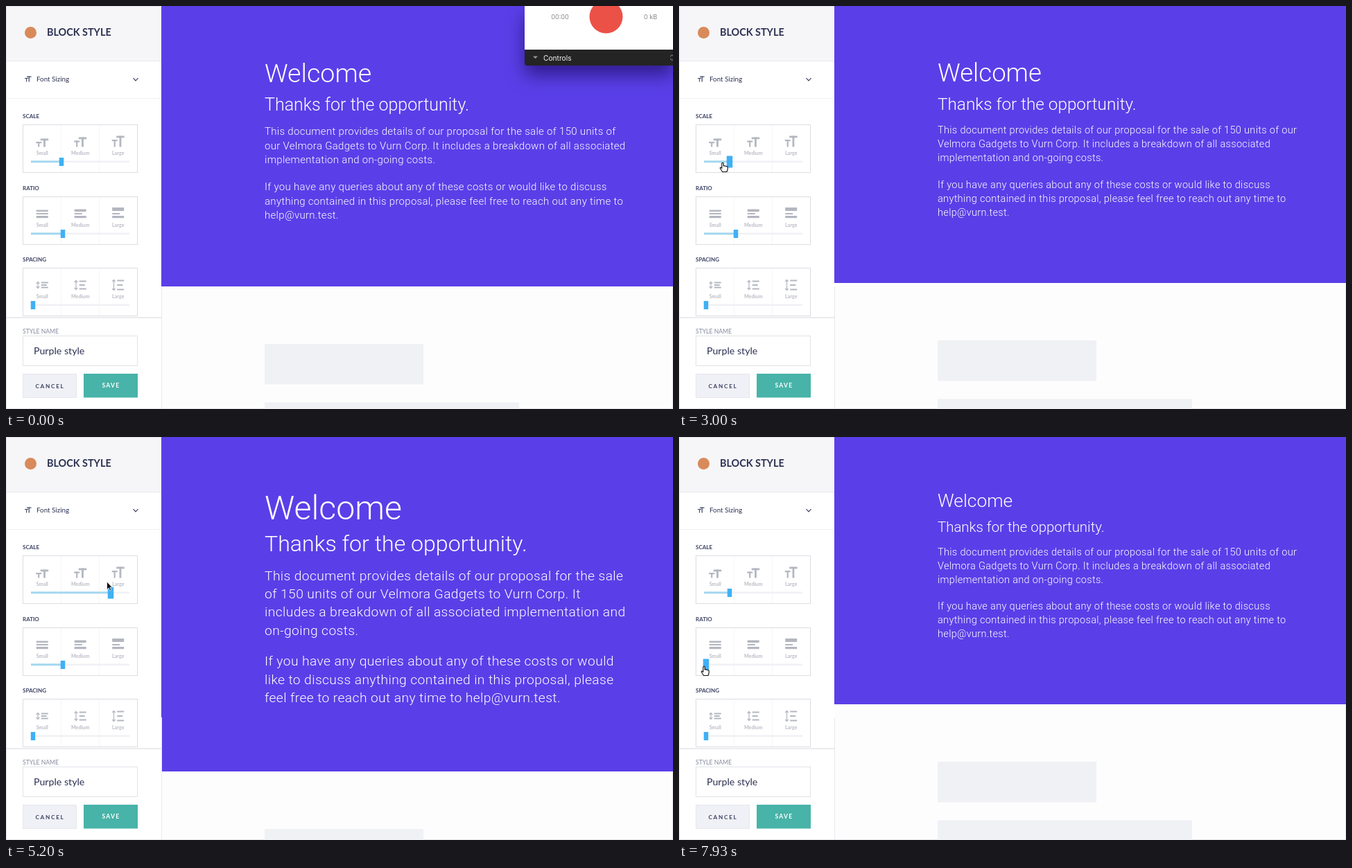
Animation of 962 by 582 pixels, one loop 8 s. Source, as an HTML page:

```html
<!DOCTYPE html>
<html lang="en">
<head>
<meta charset="utf-8">
<title>Block style</title>
<style>
  html, body { margin: 0; width: 100%; height: 100%; overflow: hidden; background: #fdfdfe; }
  svg { display: block; width: 962px; height: 582px; font-family: Lato, sans-serif; fill: #2c3153; }
  #copy { font-family: Roboto, sans-serif; font-weight: 300; fill: #fff; }
  .body { letter-spacing: .02em; }
  #recorder { font-family: Inter, sans-serif; filter: drop-shadow(0 14px 13px rgba(20, 5, 80, .6)); }
  .bold { font-weight: 700; }
  .mid { text-anchor: middle; }
</style>
</head>
<body>
<svg id="stage" viewBox="0 0 962 582">
  <rect x=".5" y=".5" width="961" height="581" fill="#fdfdfe" stroke="#e4e5ea"/>
  <g id="page">
    <rect id="purple" x="224" y="0" width="738" fill="#5a3fe8"/>
    <g id="blocks" fill="#f0f1f5">
      <rect x="373" y="83" width="229" height="58.5"/>
      <rect x="373" y="167.5" width="367" height="30"/>
    </g>
    <g id="copy"></g>
  </g>

  <g id="sidebar">
    <rect x="1" y="1" width="223" height="580" fill="#fff"/>
    <rect x="1" y="1" width="223" height="78" fill="#f6f6f8"/>
    <path d="M1 79.5H224M224.5 405V581" stroke="#e9eaee" fill="none"/>
    <path d="M1 133.5H224" stroke="#f1f1f4"/>
    <path d="M0 450H224" stroke="#e3e4e9" stroke-width="1.6"/>
    <circle cx="35.5" cy="38.5" r="8.5" fill="#d98a5a"/>
    <path d="M183.5 104.2L187 107.8L190.500 104.2" fill="none" stroke="#3d4263" stroke-width="1.2"/>
    <rect x="24.500" y="476.500" width="165" height="43" fill="#fff" stroke="#e2e3e9"/>
    <rect x="24.500" y="531.500" width="77" height="34" fill="#f0f1f6" stroke="#e6e7ed"/>
    <rect x="112" y="531" width="78" height="34.500" fill="#48b3a8"/>
  </g>

  <g id="recorder">
    <path d="M748 0H962V63H748Z" fill="#fff"/>
    <path d="M748 63H962V86H752Q748 86 748 82Z" fill="#242424"/>
    <circle cx="865.5" cy="15.500" r="24" fill="#ec5148"/>
    <path d="M760 72.500H767L763.500 76Z" fill="#999"/>
    <path d="M958 73L960.500 70.500L962 72M958 76L960.500 78.500L962 77" fill="none" stroke="#999"/>
  </g>

  <g id="cursor" stroke-linejoin="round">
    <path id="arrow" d="M0 0V11.300L2.600 8.900L4.400 13L6.200 12.200L4.400 8.200H7.800Z"
      fill="#111" stroke="#fff" stroke-width=".7"/>
    <path id="hand" d="M-1.200 1Q0 -.6 1.200 1V5Q2.300 4.200 3.300 5.200Q4.500 4.600 5.300 5.700Q6.800 5.200 7.200 6.800V9.500L6 13.500H-.4L-3.700 8.300Q-3.700 6.700 -2.300 7.200L-1.200 8.300Z"
      fill="#fff" stroke="#111" stroke-width="1.100"/>
  </g>
</svg>

<script>
const LOOP = 8000;
const $ = id => document.getElementById(id);

function add(parent, tag, attrs, content = '') {
  const node = document.createElementNS('http://www.w3.org/2000/svg', tag);
  for (const [name, value] of Object.entries(attrs)) node.setAttribute(name, value);
  node.textContent = content;
  parent.append(node);
  return node;
}
const box = (parent, x, y, width, height, fill) => add(parent, 'rect', { x, y, width, height, fill });
const label = (parent, x, y, size, content, attrs = {}) =>
  add(parent, 'text', { x, y, 'font-size': size, ...attrs }, content);

// A capital T hanging from (x, y)
function tee(parent, x, y, w, h, weight, fill) {
  box(parent, x, y, w, weight, fill);
  box(parent, x + (w - weight) / 2, y, weight, h, fill);
}

const GREY = '#b4b7c0';
const icons = {
  SCALE(g, x, y, i) {
    const bottom = y + 32.500, tall = 12 + 2 * i;
    tee(g, x - 9, bottom - 7.500 - i * 1.500, 8, 7.500 + i * 1.500, 2.200, GREY);
    tee(g, x - 2.500, bottom - tall, 11.500, tall, 2.800, GREY);
  },
  RATIO(g, x, y, i) {
    const top = [19.500, 18.500, 16][i], thick = [2.500, 3.500, 5][i];
    box(g, x - 8.500, y + top, 17, thick, GREY);
    box(g, x - 8.500, y + 24, i ? 11 : 17, 2, GREY);
    box(g, x - 8.500, y + 28, 17, 3.200, GREY);
  },
  SPACING(g, x, y, i) {
    const mid = y + 25, half = [4.500, 6.500, 7.500][i], step = half - 1;
    add(g, 'path', {
      d: `M${x - 8.500} ${mid - half + 2.500}l2.300 -2.500l2.300 2.500M${x - 6.200} ${mid - half}V${mid + half}` +
         `m-2.300 -2.500l2.300 2.500l2.300 -2.500`,
      fill: 'none', stroke: GREY, 'stroke-width': 1.200
    });
    for (const k of [-1, 0, 1]) box(g, x - 1.500, mid + k * step - 1, k ? 10 : 8, 2, GREY);
  }
};

function slider(name, y) {
  const g = $('sidebar');
  label(g, 24, y - 9, 8, name, { class: 'bold', fill: '#3d4263' });
  add(g, 'rect', { x: 24.500, y: y + .5, width: 165, height: 69, fill: '#fff', stroke: '#dcdde3' });
  for (const x of [79, 134]) box(g, x, y + 1, 1, 68, '#f5f5f7');
  ['Small', 'Medium', 'Large'].forEach((size, i) => {
    const x = [52.200, 107.200, 161.700][i];
    icons[name](g, x, y, i);
    label(g, x, y + 43.500, 7.200, size, { class: 'bold mid', fill: '#b9bcc5' });
  });
  box(g, 36, y + 52.500, 142, 2.500, '#eff1f4');
  const fill = box(g, 36, y + 52.300, 0, 3, '#a4d8ef');
  const handle = box(g, 0, 0, 0, 0, '#40b0f5');
  return (x, active) => {
    const w = active ? 8.500 : 6.500, h = active ? 17 : 12;
    fill.setAttribute('width', x - 36);
    const shape = { x: x - w / 2, y: y + 54 - h / 2, width: w, height: h };
    for (const key in shape) handle.setAttribute(key, shape[key]);
  };
}

const side = $('sidebar');
label(side, 59, 43, 14.400, 'BLOCK STYLE', { class: 'bold' });
tee(side, 27, 104, 5, 5.500, 1, '#3d4263');
tee(side, 30, 101.500, 6.500, 8, 1.200, '#3d4263');
label(side, 44, 109, 9.800, 'Font Sizing');
label(side, 24, 473.300, 8.600, 'STYLE NAME', { fill: '#858a9e' });
label(side, 40, 503, 14.200, 'Purple style');
label(side, 63.500, 552, 8.200, 'CANCEL', { class: 'bold mid', 'letter-spacing': 1.700, fill: '#3d4263' });
label(side, 151.500, 551.200, 8.600, 'SAVE', { class: 'bold mid', 'letter-spacing': 1.300, fill: '#fff' });
const setScale = slider('SCALE', 171);
const setRatio = slider('RATIO', 275);
slider('SPACING', 378)(39, false);

const recorder = $('recorder');
label(recorder, 799, 19.300, 9.100, '00:00', { class: 'mid', fill: '#858585' });
label(recorder, 929.500, 19.300, 9.100, '0 kB', { class: 'mid', fill: '#858585' });
label(recorder, 775, 78.700, 10.200, 'Controls', { fill: '#f4f4f4' });

const paragraphs = [
  'This document provides details of our proposal for the sale of 150 units of our Velmora Gadgets ' +
  'to Vurn Corp. It includes a breakdown of all associated implementation and on-going costs.',
  'If you have any queries about any of these costs or would like to discuss anything contained in ' +
  'this proposal, please feel free to reach out any time to help@vurn.test.'
];
const welcome = label($('copy'), 373, 0, 0, 'Welcome');
const thanks = label($('copy'), 373, 0, 0, 'Thanks for the opportunity.');
const lines = Array.from({ length: 10 }, () => label($('copy'), 373, 0, 0, '', { class: 'body' }));

function wrap(words, limit) {
  const rows = [''];
  for (const word of words.split(' ')) {
    const last = rows[rows.length - 1];
    const joined = last ? last + ' ' + word : word;
    if (joined.length > limit) rows.push(word);
    else rows[rows.length - 1] = joined;
  }
  return rows;
}

function place(node, y, size) {
  node.setAttribute('y', y.toFixed(2));
  node.setAttribute('font-size', size.toFixed(3));
}

function layout(scale, ratio) {
  const body = 15 + .06 * (scale - 80);
  const h1 = body * (1.810 + .0162 * (ratio - 39));
  const h2 = body * (1.400 + .00621 * (ratio - 39));
  const lead = body * 1.370;
  let y = 79.500 + .82 * h1;
  place(welcome, y, h1);
  y += 22.200 + .3 * (h1 + h2);
  place(thanks, y, h2);
  y += 13.500 + body + .26 * h2;

  let n = 0;
  for (const paragraph of paragraphs) {
    for (const row of wrap(paragraph, 1172 / body)) {
      place(lines[n], y, body);
      lines[n++].textContent = row;
      y += lead;
    }
    y += 18.300;
  }
  while (n < lines.length) lines[n++].textContent = '';

  const bottom = Math.round(y - lead - 18.300 + 90 + body / 2);
  $('purple').setAttribute('height', bottom);
  $('blocks').setAttribute('transform', `translate(0 ${bottom})`);
}

// Rows: time, then values; eased between rows
const scaleKeys = [[0, 80], [2750, 80], [3000, 73], [3500, 60], [3900, 52], [4350, 52], [5050, 151], [5280, 151], [5850, 73]];
const ratioKeys = [[0, 82], [7030, 82], [7700, 39]];
const fadeKeys = [[0, 1], [70, 1], [350, 0]];
const cursorKeys = [
  [700, 865, 16], [1750, 176, 212], [1930, 174, 213], [2500, 80, 224], [2750, 78, 225], [3000, 63, 226],
  [3850, 57, 226], [4350, 58, 226], [5050, 147, 209], [5280, 145, 209], [5850, 73, 218],
  [6200, 74, 220], [6850, 82, 328], [7030, 82, 330], [7700, 37, 331], [7930, 36, 331]
];

function at(keys, t) {
  const next = keys.findIndex(key => key[0] > t);
  if (next < 0) return keys[keys.length - 1].slice(1);
  if (next === 0) return keys[0].slice(1);
  const a = keys[next - 1], b = keys[next];
  const p = (t - a[0]) / (b[0] - a[0]), e = p * p * (3 - 2 * p);
  return a.slice(1).map((v, i) => v + (b[i + 1] - v) * e);
}
const show = (id, visible) => $(id).setAttribute('visibility', visible ? 'visible' : 'hidden');
const within = (t, from, to) => t >= from && t < to;

function draw(t) {
  const [scale] = at(scaleKeys, t), [ratio] = at(ratioKeys, t);
  setScale(scale, within(t, 2500, 6250));
  setRatio(ratio, t >= 6800);
  layout(scale, ratio);

  const [opacity] = at(fadeKeys, t);
  recorder.setAttribute('opacity', opacity);
  show('recorder', opacity > 0);

  const [x, y] = at(cursorKeys, t);
  const hand = within(t, 2500, 4500) || within(t, 5450, 6250) || t >= 6800;
  $('cursor').setAttribute('transform', `translate(${x.toFixed(1)} ${y.toFixed(1)})`);
  show('arrow', t >= 700 && !hand);
  show('hand', hand);
}

const start = performance.now();
function tick() {
  draw((performance.now() - start) % LOOP);
  requestAnimationFrame(tick);
}
tick();
</script>
</body>
</html>
```
